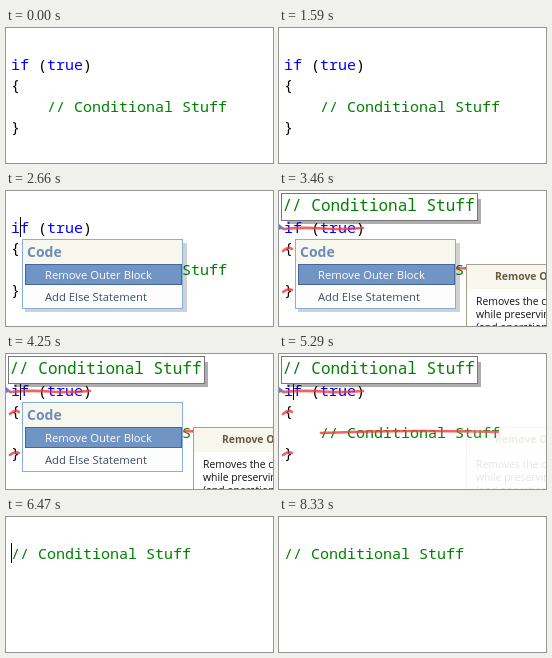
These frames come from a looping animation (267x135 px, 8.66 s). An HTML page:

```html
<!DOCTYPE html>
<html lang="en">
<head>
<meta charset="utf-8">
<title>Remove Outer Block</title>
<style>
  html, body { margin: 0; width: 100%; height: 100%; overflow: hidden; background: #fff; }
  svg { display: block; width: 100%; height: 100%; }
  text { white-space: pre; }
  .code { font: 15px "Noto Sans Mono", "DejaVu Sans Mono", monospace; }
  .large { font-size: 16px; }
  .keyword { fill: #00f; }
  .comment { fill: #008000; }
  .ui { font: 11.25px "Open Sans", "Noto Sans", sans-serif; }
  .title { font: bold 14px "Open Sans", "Noto Sans", sans-serif; fill: #6b8cb8; }
  .tip { font: 10.4px "Open Sans", "Noto Sans", sans-serif; fill: #111; }
  .tip .head { font-weight: bold; fill: #66593f; }
  .shadow { fill: #000; fill-opacity: .18; }
  #previewShadow { fill-opacity: .32; }
  #strikes path { fill: none; stroke: #f03a3c; stroke-opacity: .8; stroke-width: 2.6; stroke-linecap: round; }
</style>
</head>
<body>
<svg viewBox="0 0 267 135">
  <g id="before" class="code">
    <text x="5" y="42"><tspan class="keyword">if</tspan> (<tspan class="keyword">true</tspan>)</text>
    <text x="5" y="62">{</text>
    <text x="41" y="84" class="comment">// Conditional Stuff</text>
    <text x="5" y="104">}</text>
  </g>
  <text id="after" class="code comment" x="5" y="42">// Conditional Stuff</text>

  <g id="strikes">
    <path d="M4 38Q24 36 44 37.500T84 37"/>
    <path d="M4 60Q9 55 13 58"/>
    <path d="M42 79Q90 77 135 77T219 78"/>
    <path d="M4 101Q9 97 13 99"/>
    <path d="M0 33L5 37L0 39Z" style="fill:#6b7fd0;stroke:none"/>
  </g>
  <rect id="caret" y="26" width="1" height="20"/>
  <circle id="beacon" cx="14.5" cy="31.5" r="7.5" fill="none" stroke="#6a8dba"/>

  <path id="previewShadow" class="shadow" d="M199 8h3v25H8v-3h191z"/>
  <g id="preview">
    <rect x="2.5" y="2.5" width="196" height="27" fill="#fff" stroke="#777"/>
    <text class="code large comment" x="3.5" y="20">// Conditional Stuff</text>
  </g>

  <g id="tooltip" class="tip">
    <rect x="187.5" y="73.5" width="90" height="70" fill="#fff" stroke="#a8a08c"/>
    <rect x="188" y="74" width="80" height="24" fill="#f8f7ee"/>
    <text class="head" x="216" y="89">Remove Outer Block</text>
    <text x="197" y="114">Removes the containing block</text>
    <text x="197" y="127">while preserving its code</text>
    <text x="197" y="140">(and operations inside)</text>
  </g>

  <path id="menuShadow" class="shadow" d="M177 52h4v69H19v-4h158z"/>
  <g id="menu">
    <rect x="16.5" y="48.5" width="160" height="69" fill="#fdfdfd" stroke="#86aee0"/>
    <rect x="17" y="49" width="159" height="24" fill="#f8f7ee"/>
    <text class="title" x="21" y="66">Code</text>
    <rect x="19.5" y="73.5" width="156" height="20" fill="#7094c4" stroke="#45679b"/>
    <text class="ui" x="39" y="88" fill="#fff">Remove Outer Block</text>
    <text class="ui" x="39" y="110" fill="#3c4f6b">Add Else Statement</text>
  </g>
</svg>
<script>
const LOOP = 8660;

// Each step: start in ms, then the opacities that change.
const steps = [
  [0, { before: 1, after: 0, strikes: 0, caret: 0, beacon: 0, preview: 0,
        previewShadow: 0, tooltip: 0, menu: 0, menuShadow: 0 }],
  [1130, { caret: 1 }],
  [1590, { caret: 0 }],
  [1850, { beacon: .25 }],
  [1910, { beacon: .5 }],
  [1970, { beacon: .75 }],
  [2030, { beacon: 1 }],
  [2230, { beacon: .75 }],
  [2290, { beacon: .5 }],
  [2350, { beacon: .25 }],
  [2410, { beacon: 0 }],
  [2540, { menuShadow: 1 }],
  [2600, { menu: .5 }],
  [2660, { menu: 1, caret: 1 }],
  [3060, { previewShadow: 1 }],
  [3460, { preview: 1, strikes: 1, tooltip: 1, caret: 0 }],
  [3990, { caret: 1 }],
  [4250, { menuShadow: 0 }],
  [4310, { tooltip: .6, menu: .6 }],
  [4370, { tooltip: .25, menu: .25 }],
  [4500, { tooltip: 0, menu: 0, caret: 0 }],
  [5030, { caret: 1 }],
  [5290, { tooltip: .1 }],
  [5350, { tooltip: .55, menu: .5 }],
  [5480, { tooltip: 1, menu: 1, menuShadow: 1, caret: 0 }],
  [6080, { caret: 1 }],
  [6340, { preview: 0, previewShadow: 0, strikes: 0, tooltip: 0, menu: 0, menuShadow: 0, caret: 0 }],
  [6470, { before: 0, after: 1, caret: 1 }],
  [7470, { caret: 0 }],
  [7930, { caret: 1 }],
  [8330, { caret: 0 }]
];

const part = id => document.getElementById(id);

function draw(time) {
  const state = {};
  for (const [start, change] of steps) {
    if (start <= time) Object.assign(state, change);
  }
  for (const id in state) part(id).style.opacity = state[id];
  part("caret").setAttribute("x", state.after ? 5 : 14);
}

const origin = performance.now();
function tick() {
  draw((performance.now() - origin) % LOOP);
  requestAnimationFrame(tick);
}
tick();
</script>
</body>
</html>
```
